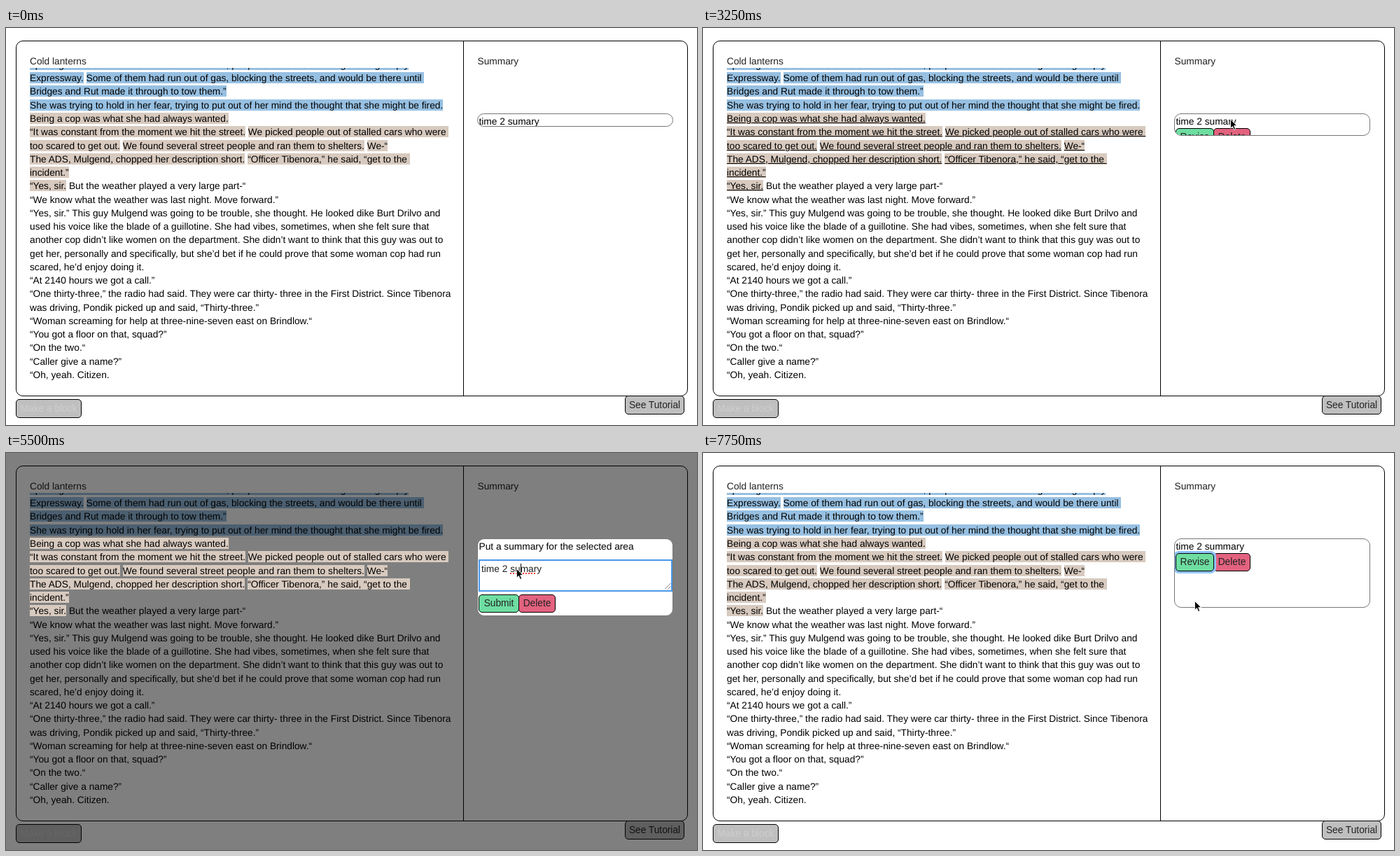
Write an HTML page that moves like this. It is 987 by 567 pixels and loops after 8 s.

```html
<!DOCTYPE html>
<html lang="en">
<head>
<meta charset="utf-8">
<title>Summary editor</title>
<style>
  html, body { margin: 0; width: 100%; height: 100%; overflow: hidden; background: #fff; }
  body { position: relative; font: 13.72px/19.27px "Liberation Sans", Arial, sans-serif;
         color: #000; white-space: pre; text-rendering: geometricPrecision; }
  div, button, svg { position: absolute; box-sizing: border-box; }
  .panel { left: 14px; top: 18px; width: 960px; height: 508px; border: 1px solid #000; border-radius: 10px; }
  .divider { left: 653px; top: 18px; width: 1px; height: 507px; background: #000; }
  .heading { top: 37.6px; color: #222; }
  .story { left: 34px; top: 57px; width: 612px; height: 456px; overflow: hidden; }
  #lines { top: -14.1px; left: 0; }
  #lines span { padding-top: 1px; }
  .blue { background: #97c0e2; }
  .tan { background: #d8cabf; position: relative; }
  .underlined .tan { text-decoration: underline; }
  button { font: inherit; color: #222; padding: 0; margin: 0; border: 1px solid #000; border-radius: 5px;
           height: 26px; line-height: 24px; text-align: center; }
  .gray { background: #bfbfbf; height: 27px; }
  .green { background: #6edda1; }
  .red { background: #e2627f; }
  .ring { box-shadow: 0 0 0 3px #8fc3fa; z-index: 1; }
  #shade { inset: 0; background: rgba(0, 0, 0, .5); display: none; }
  .dimmed #shade { display: block; z-index: 1; }
  .dimmed .tan, .dimmed #box { z-index: 2; }
  #box { left: 673px; top: 122px; width: 280px; border: 1px solid #777; border-radius: 10px;
         background: #fff; overflow: hidden; }
  #box > div { left: 0; top: 0; width: 278px; height: 109px; }
  .label { left: 1.5px; top: .6px; }
  .field { left: 1px; top: 29px; width: 277px; height: 46px; border: 1px solid #777; }
  .field.focus { border: 2px solid #4a97ea; }
  #entry { left: 5px; top: 32.8px; color: #222; }
  .misspelt { text-decoration: underline dotted #f33 2px; text-underline-offset: 1.5px; }
  .caret { border-left: 1px solid #000; margin-right: -1px; }
  #cursor { left: 0; top: 0; z-index: 3; overflow: visible; }
</style>
</head>
<body>
<div class="panel"></div>
<div class="divider"></div>
<div class="heading" style="left:34px">Cold lanterns</div>
<div class="heading" style="left:673.5px">Summary</div>
<div class="story"><div id="lines"></div></div>
<button class="gray" style="left:14px;top:530px;width:94px;color:#cecece">Make a block</button>
<button class="gray" style="left:884px;top:525px;width:85px">See Tutorial</button>
<div id="shade"></div>
<div id="box">
  <div id="view"><div class="label" id="summary"></div><button id="revise" class="green" style="left:1px;top:20px;width:55px">Revise</button><button class="red" style="left:55px;top:20px;width:53px">Delete</button></div>
  <div id="editor"><div class="label">Put a summary for the selected area</div><div class="field" id="field"></div><div id="entry"></div><svg style="left:267px;top:63px" width="9" height="9" stroke="#777" fill="none"><path d="M0 8.5 8.5 0M4.5 8.5 8.5 4.5"/></svg><button id="submit" class="green" style="left:1px;top:79px;width:58px">Submit</button><button class="red" style="left:58px;top:79px;width:53px">Delete</button></div>
</div>
<svg id="cursor" width="11" height="17"><path d="M.4 .4V13.2L3.4 10.4 5.5 15.4 7.7 14.5 5.6 9.6H9.6Z" fill="#000" stroke="#fff" stroke-width=".9"/></svg>
<script>
const $ = id => document.getElementById(id);

// {…} marks blue passages, […] marks tan ones.
const story = `{opening of the storm there were stranded cars, people and trucks all along that big empty}
{Expressway.} {Some of them had run out of gas, blocking the streets, and would be there until }
{Bridges and Rut made it through to tow them.”}
{She was trying to hold in her fear, trying to put out of her mind the thought that she might be fired.}
[Being a cop was what she had always wanted.]
[“It was constant from the moment we hit the street.] [We picked people out of stalled cars who were ]
[too scared to get out.] [We found several street people and ran them to shelters.] [We-“]
[The ADS, Mulgend, chopped her description short.] [“Officer Tibenora,” he said, “get to the ]
[incident.”]
[“Yes, sir.] But the weather played a very large part-“
“We know what the weather was last night. Move forward.”
“Yes, sir.” This guy Mulgend was going to be trouble, she thought. He looked dike Burt Drilvo and
used his voice like the blade of a guillotine. She had vibes, sometimes, when she felt sure that
another cop didn’t like women on the department. She didn’t want to think that this guy was out to
get her, personally and specifically, but she’d bet if he could prove that some woman cop had run
scared, he’d enjoy doing it.
“At 2140 hours we got a call.”
“One thirty-three,” the radio had said. They were car thirty- three in the First District. Since Tibenora
was driving, Pondik picked up and said, “Thirty-three.”
“Woman screaming for help at three-nine-seven east on Brindlow.“
“You got a floor on that, squad?”
“On the two.“
“Caller give a name?”
“Oh, yeah. Citizen.`;
$('lines').innerHTML = story
  .replace(/\{(.*?)\}/g, '<span class="blue">$1</span>')
  .replace(/\[(.*?)\]/g, '<span class="tan">$1</span>');

const LOOP = 8000, STEP = 250;
// Pointer path: time, x, y
const path = [
  [500, 770, 26], [1000, 764, 104], [1250, 766, 128], [1500, 767, 131], [1750, 767, 131],
  [2000, 700, 110], [2250, 679, 98], [2500, 733, 89], [2750, 752, 113], [3000, 753, 130],
  [3750, 753, 130], [4000, 718, 152], [4250, 702, 160], [4750, 702, 160],
  [5250, 729, 165], [6500, 729, 165], [7000, 716, 190], [7500, 702, 211], [8000, 702, 211]
];

function pointerAt(t) {
  const i = path.findIndex(p => p[0] > t);
  const [t0, x0, y0] = path[i - 1], [t1, x1, y1] = path[i];
  const k = (t - t0) / (t1 - t0);
  return [x0 + (x1 - x0) * k, y0 + (y1 - y0) * k];
}

function boxHeight(t) {
  if (t >= 7750) return 99;
  if (t >= 4750) return 111;
  return 19 + 26 * Math.min(1, Math.max(0, (t - 3000) / 500));
}

function entryText(t) {
  const caret = '<span class="caret"></span>';
  if (t < 5500) return 'time 2 sumary';
  if (t < 6000) return `time 2 <span class="misspelt">su${caret}mary</span>`;
  return `time 2 sum${caret}mary`;
}

let shown = -1;
function draw(now) {
  requestAnimationFrame(draw);
  const t = Math.floor(now % LOOP / STEP) * STEP;
  if (t === shown) return;
  shown = t;
  const editing = t >= 4750 && t < 7750;
  document.body.classList.toggle('dimmed', editing);
  document.body.classList.toggle('underlined', t >= 3000 && t < 4750);
  $('view').hidden = editing;
  $('editor').hidden = !editing;
  $('box').style.height = boxHeight(t) + 'px';
  $('summary').textContent = t < 7750 ? 'time 2 sumary' : 'time 2 summary';
  $('entry').innerHTML = entryText(t);
  $('revise').classList.toggle('ring', t >= 4250);
  $('submit').classList.toggle('ring', t < 5500);
  $('field').classList.toggle('focus', t >= 5500);
  $('cursor').style.visibility = t < 500 ? 'hidden' : 'visible';
  if (t >= 500) {
    const [x, y] = pointerAt(t);
    $('cursor').style.transform = `translate(${x}px, ${y}px)`;
  }
}
draw(performance.now());
</script>
</body>
</html>
```
